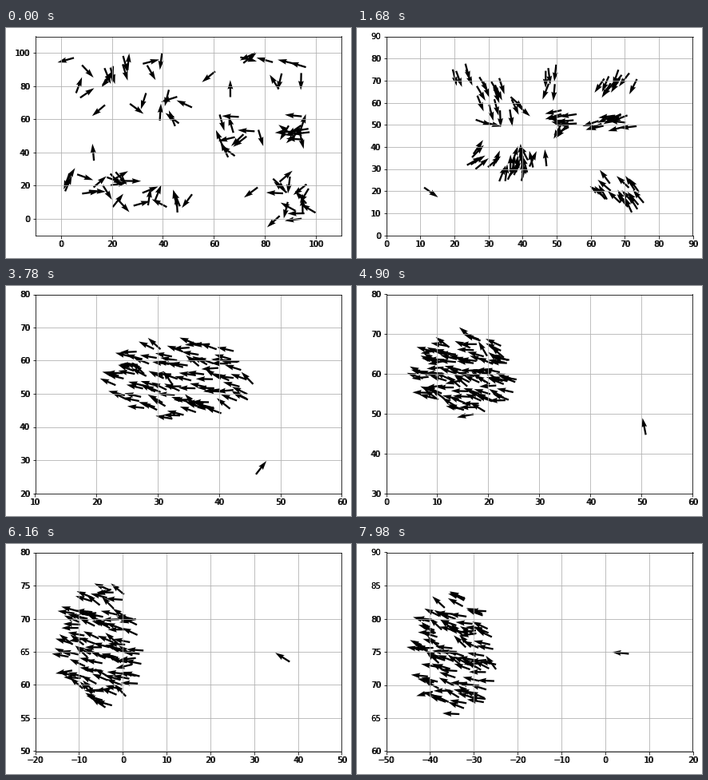
These frames come from a looping animation (432 by 288 pixels, 8000 ms). A matplotlib script:

```python
import numpy as np
import matplotlib.pyplot as plt
from matplotlib.animation import FuncAnimation

W, H = 432, 288
LOOP, TICK, STEP = 8000, 40, 140
GOLDEN = np.pi * (3 - np.sqrt(5))
KEYS = np.array([0, 6, 19, 27, 35, 44, 57])
MEET = np.array([43, 47])
rng = np.random.default_rng(5)

# Early swarms: size, x, y, heading
SWARMS = [(4, 12, 84, 8), (8, 24, 82, -62), (7, 36, 67, 195),
          (2, 22, 57, -100), (3, 43, 94, -55), (6, 15, 27, 15),
          (11, 29, 18, 30), (8, 41, 19, 70), (2, 58, 79, 185),
          (11, 61, 53, 178), (12, 83, 54, 172), (9, 78, 87, 232),
          (16, 82, 11, 200)]

# The straggler's x, y, heading at each key
LONE = np.array([(13, 35, 95), (4.5, 33, -97), (28, 16.5, 5), (46, 25.7, 52),
                 (50.8, 44.7, 101), (38.1, 63.5, 148), (5.4, 74.7, 174)])


def unit(a):
    return np.stack([np.cos(a), np.sin(a)], -1)


def angle(v):
    return np.arctan2(v[:, 1], v[:, 0])


def length(v):
    return np.linalg.norm(v, axis=1)[:, None]


def seeds(n, wobble=0):
    """Sunflower points in the unit disc, shaken along their circles."""
    i = np.arange(n)
    return (np.sqrt((i + 0.5) / n)[:, None]
            * unit(i * GOLDEN + rng.normal(0, wobble, n)))


def strips(p):
    """Order points by column, then by height within each column."""
    cols = np.argsort(p[:, 0]).reshape(9, 11)
    return np.concatenate([c[np.argsort(p[c, 1])] for c in cols])


def build_flock():
    swarm = np.concatenate([(x, y) + 1.75 * np.sqrt(n) * seeds(n)
                            for n, x, y, _ in SWARMS])
    course = np.radians(np.repeat([s[3] for s in SWARMS],
                                  [s[0] for s in SWARMS]))
    n = len(swarm)

    # Scattered start: trace each course back with a random bend
    bend = rng.uniform(-1.4, 1.4, n)
    start = swarm - rng.uniform(9, 14, (n, 1)) * unit(course + bend)
    start = start.clip(0, 100)

    # All head for one place; the far ones are still on their way
    gap = swarm - MEET
    dist = length(gap)
    left = np.maximum(1 - (24 + swarm[:, :1] / 9) / dist, 0)
    gap[:, 1] *= np.where(gap[:, 1] > 0, 0.45, 1)
    core = 7 * (1 - left) * rng.permutation(seeds(n))
    merge = (MEET + left * gap + core).clip(17, 64)

    # A drifting disc that tightens; each bird keeps its place in it
    disc = seeds(n, 0.35)
    home = np.empty((n, 2))
    home[strips(merge)] = disc[strips(disc)]
    pos, head = [start, swarm, merge], [
        angle(swarm - start) + rng.normal(0, 0.8, n),
        course + rng.normal(0, 0.25, n),
        angle(MEET - swarm) + rng.normal(0, 0.3, n)]
    for s in KEYS[3:] - KEYS[3]:
        place = angle(home) + rng.normal(0, 0.12, n)
        radius = 8.9 + 3 * np.exp(-s / 6)
        pos.append((34.6 - 2.25 * s, 54 + 0.68 * s)
                   + radius * length(home) * unit(place))
        head.append(np.radians(rng.normal(163, 15, n)))
    return np.array(pos), np.array(head)


flock, turn = build_flock()
points = np.concatenate([flock, LONE[:, None, :2]], axis=1)
heads = np.concatenate([turn, np.radians(LONE[:, 2:])], axis=1)


def state(step):
    """Positions and unit headings on the curves between two keys."""
    k = min(np.searchsorted(KEYS, step, side="right") - 1, len(KEYS) - 2)
    t = (step - KEYS[k]) / (KEYS[k + 1] - KEYS[k])
    p, q = points[k], points[k + 1]
    chord = length(q - p)
    a, b = chord * unit(heads[k]), chord * unit(heads[k + 1])
    ease = 3 * t**2 - 2 * t**3
    pos = (p + ease * (q - p) + t * (1 - t)**2 * a - t**2 * (1 - t) * b)
    vel = (6 * t * (1 - t) * (q - p)
           + (1 - t) * (1 - 3 * t) * a + t * (3 * t - 2) * b)
    return pos, unit(angle(vel))


fig = plt.figure(figsize=(W / 72, H / 72), dpi=72)
left, bottom, width, height = 36.5 / W, 28.5 / H, 384 / W, 249 / H
ax = fig.add_axes([left, bottom, width, height])
ax.grid(True)
# Labels repeated one pixel to the right give the heavy tick text
bold = fig.add_axes([left + 1 / W, bottom, width, height],
                    sharex=ax, sharey=ax, frameon=False)
bold.tick_params(length=0, pad=7)

pos, way = state(0)
arrows = ax.quiver(pos[:, 0], pos[:, 1], way[:, 0], way[:, 1],
                   scale=18, width=0.006, color="black")


def update(i):
    pos, way = state((i * TICK + TICK // 2) // STEP)
    arrows.set_offsets(pos)
    arrows.set_UVC(way[:, 0], way[:, 1])
    lo, hi = np.round(pos.min(0), -1) - 10, np.round(pos.max(0), -1) + 10
    ax.set_xlim(lo[0], hi[0])
    ax.set_ylim(lo[1], hi[1])
    return [arrows]


anim = FuncAnimation(fig, update, frames=LOOP // TICK, interval=TICK,
                     init_func=lambda: update(0), repeat=True, repeat_delay=0)
plt.show()
```
